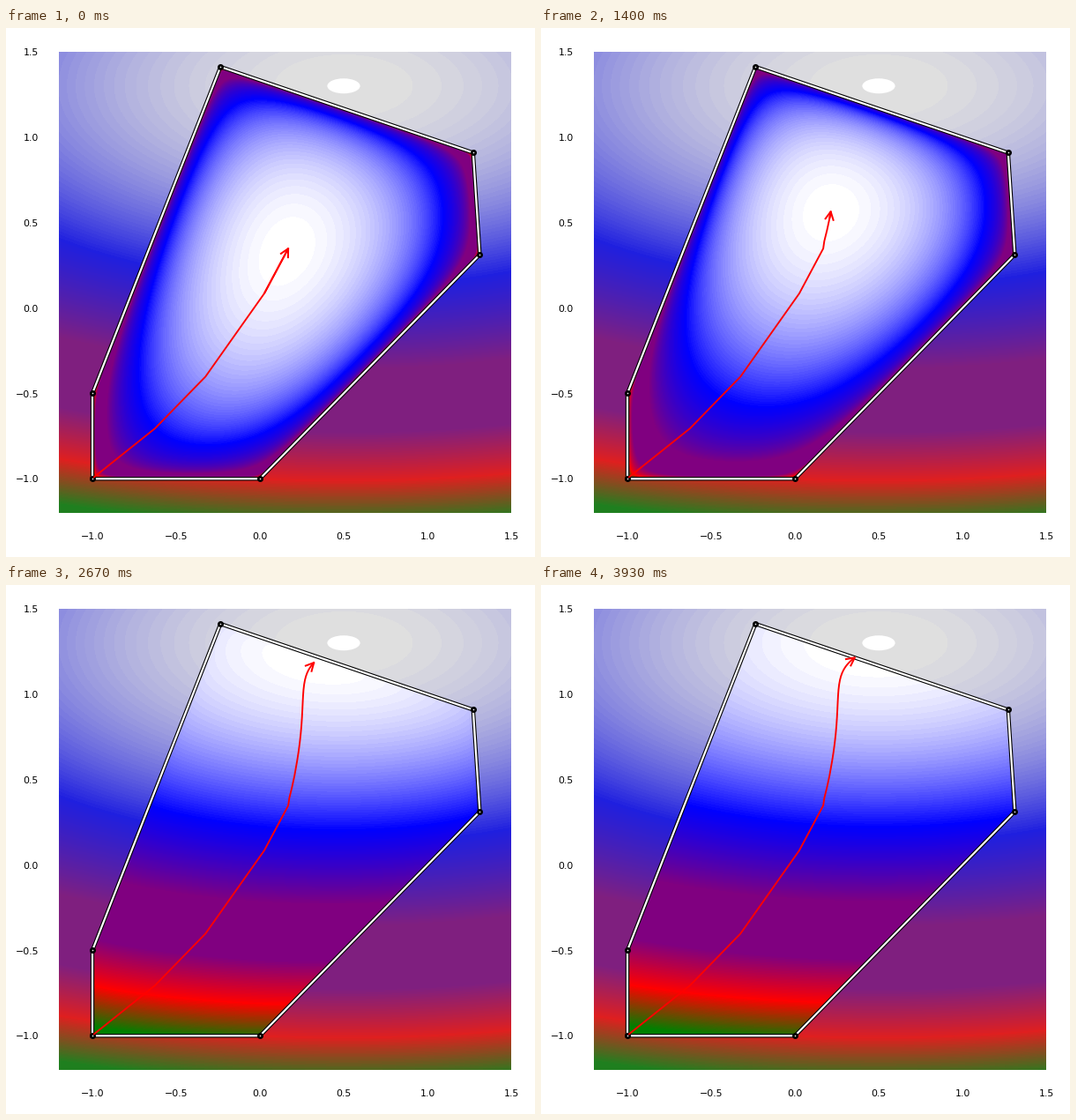
A matplotlib script that plays this animation: 600 by 600 pixels, repeating every 3990 ms.

```python
import numpy as np
import matplotlib.pyplot as plt
from matplotlib.animation import FuncAnimation
from matplotlib.colors import LinearSegmentedColormap
from matplotlib.patches import Ellipse
from matplotlib.path import Path

FRAMES, LOOP_MS = 60, 3990
DPI, SIZE = 100, 600
LEFT, TOP, W, H = 60, 27, 513, 523
LO, HI = -1.2, 1.5
LEVELS = 200
MU0, DECAY = 5000, 0.75
TOL = 0.004

GOAL = np.array([0.5, 1.3])
WEIGHT = np.array([1.0, 5.0])
CORNERS = np.array([(-1, -1), (0, -1), (1.3125, 0.3125),
                    (14 / 11, 10 / 11), (-4 / 17, 24 / 17), (-1, -0.5)])
# Steepest places of the lattice; the higher one ends the colour scale
PEAKS = np.array([(-0.99, -0.99), (1.31, 0.34)])
# Centring steps taken before the barrier weight starts to fall
CENTRING = np.array([(-0.99, -0.99), (-0.626, -0.705), (-0.325, -0.402),
                     (0.026, 0.085), (0.169, 0.348)])

# Inward unit normals and offsets: distance to edge i is N[i] . p - C[i]
edges = np.roll(CORNERS, -1, axis=0) - CORNERS
N = np.column_stack([-edges[:, 1], edges[:, 0]])
N /= np.linalg.norm(N, axis=1)[:, None]
C = (N * CORNERS).sum(axis=1)

CMAP = LinearSegmentedColormap.from_list(
    "levels", [(0, "white"), (0.2, "blue"), (0.4, "purple"), (0.6, "purple"),
               (0.78, "red"), (0.96, "green"), (1, "green")], N=1001)


def px(n):
    """Pixels to points."""
    return n * 72 / DPI


def objective(p):
    return (WEIGHT * (p - GOAL) ** 2).sum(axis=-1)


def barrier(p):
    return -np.log(np.maximum(p @ N.T - C, 1e-4)).sum(axis=-1)


def newton_step(p, mu):
    d = N @ p - C
    scaled = N / d[:, None]
    grad = 2 * WEIGHT * (p - GOAL) / mu - scaled.sum(axis=0)
    hess = np.diag(2 * WEIGHT / mu) + scaled.T @ scaled
    step = -np.linalg.solve(hess, grad)
    return step, -grad @ step


def follow(p, mu):
    """Newton iterates from p until the decrement is small."""
    found = []
    for _ in range(30):
        step, dec = newton_step(p, mu)
        if dec < TOL:
            break
        while (N @ (p + step) - C).min() <= 0:
            step = step / 2
        p = p + step
        found.append(p)
    return found


def banded(t):
    t = np.floor(np.clip(t, 0, 1) * LEVELS) / LEVELS
    return CMAP(t)[..., :3]


def build_paths():
    path, paths = list(CENTRING), []
    for k in range(FRAMES):
        path = path + follow(path[-1], MU0 * DECAY ** k)
        paths.append(np.array(path))
    return paths


paths = build_paths()

xs = LO + (np.arange(W) + 0.5) * (HI - LO) / W
ys = HI - (np.arange(H) + 0.5) * (HI - LO) / H
grid = np.stack(np.meshgrid(xs, ys), axis=-1)
inside = Path(CORNERS).contains_points(grid.reshape(-1, 2)).reshape(H, W)
f_in = objective(grid[inside])
b_in = barrier(grid[inside])

f_all = objective(grid)
outer = 0.75 * banded(f_all / objective(np.array([LO, LO]))) + 0.25 * 0.5


def field(mu):
    v = f_in + mu * b_in
    low = v.min()
    high = (objective(PEAKS) + mu * barrier(PEAKS)).max()
    img = outer.copy()
    img[inside] = banded((v - low) / (high - low))
    return img


fig = plt.figure(figsize=(SIZE / DPI, SIZE / DPI), dpi=DPI, facecolor="white")
ax = fig.add_axes([LEFT / SIZE, 1 - (TOP + H) / SIZE, W / SIZE, H / SIZE])
picture = ax.imshow(field(MU0), extent=(LO, HI, LO, HI), aspect="auto",
                    interpolation="none")
ax.set_xlim(LO, HI)
ax.set_ylim(LO, HI)
ax.axis("off")

ax.add_patch(Ellipse(GOAL, 0.196, 0.088, fc="white", ec="none", zorder=2))

ring = np.vstack([CORNERS, CORNERS[:1]])
for color, width in (("black", 4.4), ("white", 2.2)):
    ax.plot(*ring.T, color=color, lw=px(width), solid_joinstyle="round",
            zorder=3)
for color, width in (("black", 7), ("white", 1.6)):
    ax.plot(*CORNERS.T, "o", color=color, ms=px(width), mew=0, zorder=4)

red = dict(color="red", zorder=5)
trail, = ax.plot([], [], lw=px(1.9), solid_joinstyle="round", **red)
last, = ax.plot([], [], lw=px(2), solid_capstyle="butt", **red)
head, = ax.plot([], [], lw=px(2), solid_joinstyle="miter",
                solid_capstyle="butt", **red)

font = dict(family="DejaVu Sans", size=px(11), color="black", va="baseline")
for v in np.arange(-1, 1.6, 0.5):
    label = f"{v:.1f}".replace("-", "\u2212")
    x = LEFT + (v - LO) / (HI - LO) * W
    y = TOP + (HI - v) / (HI - LO) * H
    fig.text(x / SIZE, 1 - 580.5 / SIZE, label, ha="center", **font)
    fig.text(37 / SIZE, 1 - (y + 4.2) / SIZE, label, ha="right", **font)

UNIT = np.array([W, H]) / (HI - LO)


def arrow_head(a, b, size=11, spread=np.radians(27)):
    back = (a - b) * UNIT
    ang = np.arctan2(back[1], back[0])
    barbs = [b + size * np.array([np.cos(ang + s), np.sin(ang + s)]) / UNIT
             for s in (-spread, spread)]
    return np.array([barbs[0], b, barbs[1]])


def update(k):
    path = paths[k]
    picture.set_data(field(MU0 * DECAY ** k))
    trail.set_data(*path.T)
    last.set_data(*path[-2:].T)
    head.set_data(*arrow_head(path[-2], path[-1]).T)
    return picture, trail, last, head


anim = FuncAnimation(fig, update, frames=FRAMES, interval=LOOP_MS / FRAMES,
                     repeat=True, repeat_delay=0)
plt.show()
```
